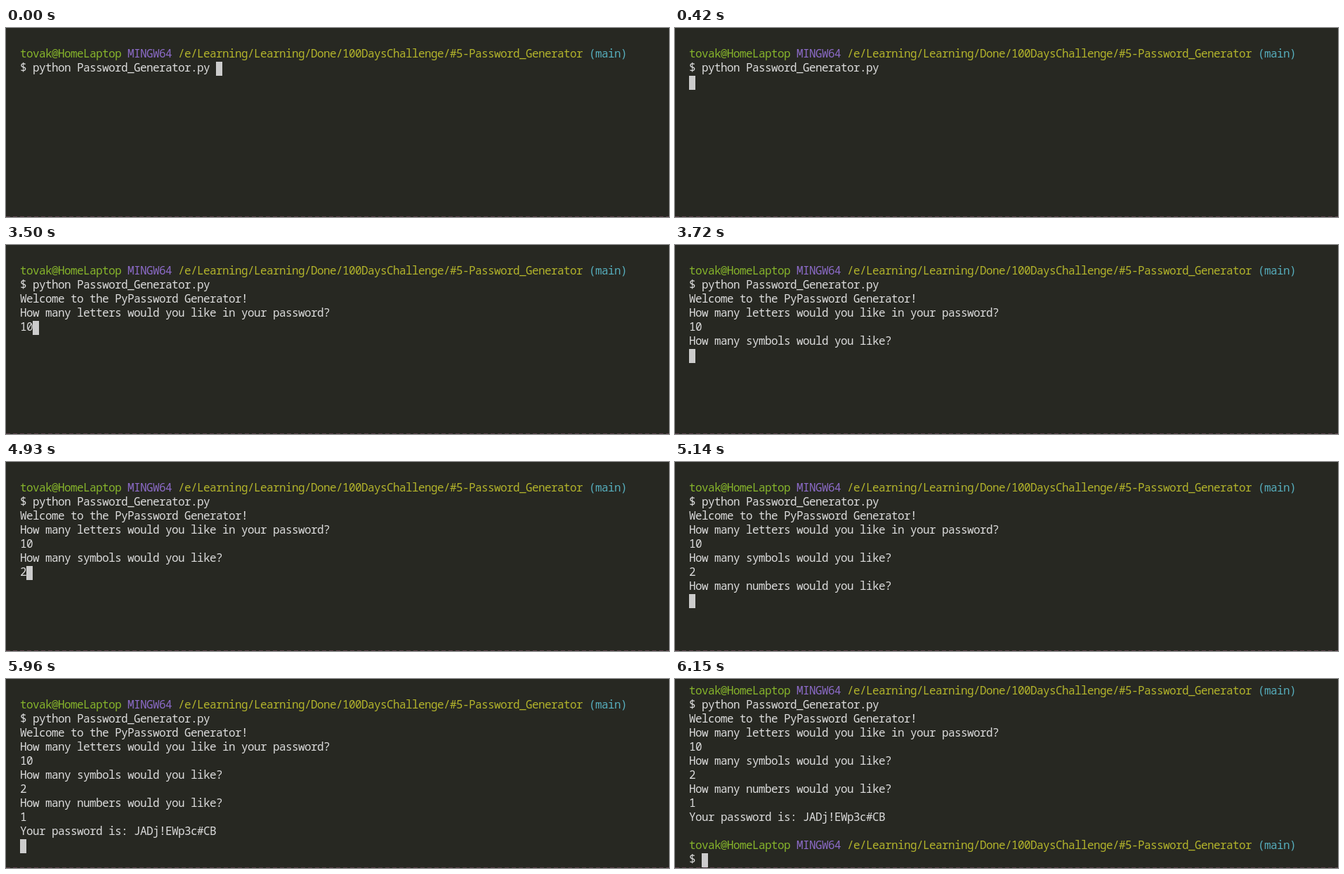
Recreate the animation shown at these times as an HTML page. Size 944x269 px, loop 8210 ms.

```html
<!DOCTYPE html>
<html lang="en">
<head>
<meta charset="utf-8">
<title>Password generator in a terminal</title>
<style>
  html, body { margin: 0; width: 100%; height: 100%; overflow: hidden; background: #272822; }
  pre {
    position: absolute; left: 20px; top: 26px; margin: 0;
    font: 500 16px/20px "Noto Sans Mono", monospace;
    letter-spacing: -0.6px;
    font-variant-ligatures: none; color: #dcdcdc;
  }
  #cursor { position: absolute; width: 9px; height: 20px; background: #ccc; }
  #edge {
    position: absolute; left: 0; top: 268px; width: 944px; height: 1px;
    background: repeating-linear-gradient(90deg, #59404a 0 6px, #272822 6px 10px);
  }
  .user { color: #86b42b; }
  .system { color: #8c6bc8; }
  .path { color: #b3b42b; }
  .branch { color: #56adbc; }
</style>
</head>
<body>
<div id="cursor"></div>
<pre id="screen"></pre>
<div id="edge"></div>
<script>
const LOOP = 8210, CELL = 9, ROW = 20, LEFT = 20, TOP = 28, TEXT_LIFT = 2;
const VISIBLE_ROWS = 12;

const screen = document.getElementById("screen");
const cursor = document.getElementById("cursor");

const promptParts = [
  ["user", "tovak@HomeLaptop"],
  ["system", "MINGW64"],
  ["path", "/e/Learning/Learning/Done/100DaysChallenge/#5-Password_Generator"],
  ["branch", "(main)"],
];
const prompt = promptParts
  .map(([name, text]) => `<span class="${name}">${text}</span>`)
  .join(" ") + "\n$ ";

// Each event appends its text to the terminal at the given time.
const events = [
  [0, prompt + "python Password_Generator.py "],
  [420, "\n"],
  [610, "Welcome to the PyPassword Generator!\nHow many letters would you like in your password?\n"],
  [3500, "10"],
  [3720, "\nHow many symbols would you like?\n"],
  [4930, "2"],
  [5140, "\nHow many numbers would you like?\n"],
  [5560, "1"],
  [5960, "\nYour password is: JADj!EWp3c#CB\n"],
  [6150, "\n" + prompt],
];

let shown = "";

function render(time) {
  const output = events.filter(([at]) => time >= at).map(([, text]) => text).join("");
  if (output === shown) return;
  shown = output;
  screen.innerHTML = output;

  const lines = screen.textContent.split("\n");
  const top = TOP - Math.max(0, lines.length - VISIBLE_ROWS) * ROW;
  screen.style.top = top - TEXT_LIFT + "px";
  cursor.style.left = LEFT + lines.at(-1).length * CELL + "px";
  cursor.style.top = top + (lines.length - 1) * ROW + "px";
}

function tick() {
  render(performance.now() % LOOP);
  requestAnimationFrame(tick);
}
tick();
</script>
</body>
</html>
```
